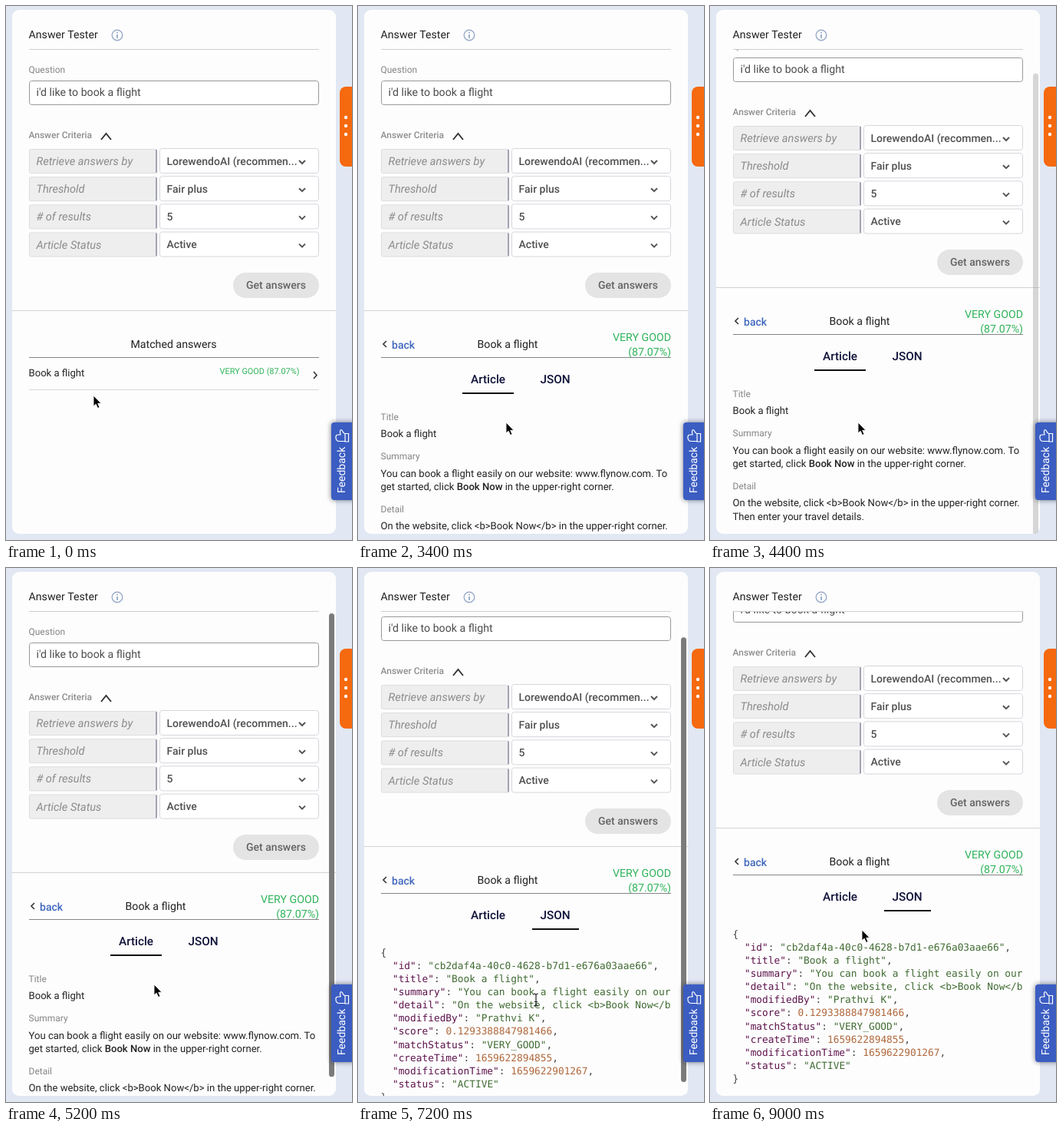
An HTML page that plays this animation: 451 px wide and 695 px high, repeating every 9.2 s.

```html
<!DOCTYPE html>
<html lang="en">
<head>
<meta charset="utf-8">
<title>Answer Tester</title>
<style>
  html, body { margin: 0; height: 100%; overflow: hidden; background: #e1e8f4; }
  svg { display: block; width: 451px; height: 695px; }
  text { font: 14.2px Roboto, sans-serif; fill: #222; white-space: pre; text-rendering: geometricPrecision; }
  .label { font-size: 12px; fill: #858585; }
  .medium { font-weight: 500; font-size: 14px; fill: #505050; }
  .hint { font-style: italic; font-size: 14.6px; fill: #8b8b8b; }
  .body { font-size: 13.1px; }
  .tab { font-weight: 500; font-size: 15.3px; fill: #11133a; }
  .good { fill: #2fb35a; text-anchor: end; }
  .mid { text-anchor: middle; }
  .line { fill: none; stroke: #333; stroke-width: 1.6; }
  .code text { font: 12.82px "DejaVu Sans Mono", monospace; fill: #444; }
  .code .key { fill: #5d124b; }
  .code .string { fill: #416c33; }
  .code .number { fill: #b0683c; }
</style>
</head>
<body>
<svg viewBox="0 0 451 695">
  <defs>
    <clipPath id="view"><path d="M8 57H430V679a8 8 0 0 1-8 8H16a8 8 0 0 1-8-8z"/></clipPath>
    <clipPath id="codeBox"><path d="M30 520H408V800H30z"/></clipPath>
    <filter id="shadow" x="-50%" y="-20%" width="200%" height="140%">
      <feDropShadow dx="0" dy="0" stdDeviation="3" flood-color="#223" flood-opacity=".65"/>
    </filter>
  </defs>

  <rect x="8" y="5" width="422" height="682" rx="9" fill="#fdfdfd"/>
  <text x="29.5" y="42">Answer Tester</text>
  <circle cx="145" cy="38" r="6.8" fill="none" stroke="#9aabca" stroke-width="1.4"/>
  <path d="M145 34v1.6M145 37v5" stroke="#8398c0" stroke-width="1.5"/>
  <path d="M30 56.5H408" stroke="#cfcfcf"/>

  <g clip-path="url(#view)">
    <g id="page">
      <text class="label" x="29.5" y="87">Question</text>
      <rect x="30.5" y="97.5" width="377" height="31" rx="3" fill="#fff" stroke="#999"/>
      <text x="39.5" y="117" style="fill:#4c4c4c">i'd like to book a flight</text>
      <text class="label" x="29.5" y="172" style="font-weight:500;fill:#8e8e8e">Answer Criteria</text>
      <path class="line" d="M124 174L130.5 166L137 174" style="stroke-width:1.9"/>
      <g id="criteria"></g>
      <rect x="296" y="347" width="112" height="33" rx="16.5" fill="#e4e4e4"/>
      <text class="medium mid" x="352" y="368" style="fill:#646464">Get answers</text>
      <path d="M8 396.5H430" stroke="#d3d3d6"/>

      <g id="list">
        <text class="mid" x="218.5" y="445">Matched answers</text>
        <text class="body" x="29.5" y="482">Book a flight</text>
        <text class="good" x="382.5" y="479" style="font-size:10.9px">VERY GOOD (87.07%)</text>
        <path class="line" d="M401 476L405 480.5L401 485"/>
        <path d="M30 499.5H408" stroke="#d8d8d8"/>
      </g>

      <g id="detail">
        <path class="line" d="M37 436L33 440L37 444"/>
        <text class="medium" x="44" y="446" style="fill:#3f67bd">back</text>
        <text x="155.5" y="445">Book a flight</text>
        <text class="good" x="408" y="436">VERY GOOD</text>
        <text class="good" x="408" y="455">(87.07%)</text>
        <text class="tab" x="147" y="491">Article</text>
        <text class="tab" x="237.5" y="491">JSON</text>
        <path id="underline" stroke="#111" stroke-width="2"/>
        <g id="article">
          <text class="label" x="29.5" y="539">Title</text>
          <text class="body" x="29.5" y="561">Book a flight</text>
          <text class="label" x="29.5" y="590">Summary</text>
          <text class="body" x="29.5" y="613">You can book a flight easily on our website: www.flynow.com. To</text>
          <text class="body" x="29.5" y="630">get started, click <tspan font-weight="500">Book Now</tspan> in the upper-right corner.</text>
          <text class="label" x="29.5" y="659">Detail</text>
          <text class="body" x="29.5" y="681">On the website, click &lt;b&gt;Book Now&lt;/b&gt; in the upper-right corner.</text>
          <text class="body" x="29.5" y="699">Then enter your travel details.</text>
        </g>
        <g id="json" class="code" clip-path="url(#codeBox)"></g>
      </g>
      <path d="M30 457.5H408" stroke="#858585"/>
    </g>
    <rect id="thumb" x="421" width="7" rx="3.5" fill="#7b7b7b"/>
  </g>

  <rect x="435" y="105" width="30" height="104" rx="8" fill="#f5690f"/>
  <g fill="#fff">
    <circle cx="443" cy="145" r="2.2"/><circle cx="443" cy="156" r="2.2"/><circle cx="443" cy="167" r="2.2"/>
  </g>
  <rect x="424" y="542" width="40" height="101" rx="4" fill="#3b5dc2" filter="url(#shadow)"/>
  <text transform="translate(441.5 634) rotate(-90)" style="font-size:14px;fill:#fff">Feedback</text>
  <path d="M442 557V566.5H433.5Q430.5 566 430 562.5V560Q430.5 558 433 558H436Q434.5 552 437 551.5Q438.5 552 439.5 555ZM442 556.5H446.5V567H442Z"
        fill="none" stroke="#fff" stroke-width="1.2"/>

  <g id="cursor">
    <path d="M0 0V14L3.2 11.2L5.6 16.5L8 15.4L5.7 10.3H10Z" fill="#000" stroke="#fff" stroke-width=".9"/>
    <path d="M-2 9V1.2Q-2-.6-.5-.6T1 1.2V6Q3 5 4 6.5Q6 5.8 6.8 7.2Q9 6.8 9 9V12Q9 14 7.5 17.5H-.5Q-1.5 14.5-5 10.5Q-4.5 8-2 10ZM2 11v4M4.3 11v4M6.5 11v4"
          fill="#fff" stroke="#000" stroke-width="1.1"/>
    <path d="M-3-8Q0-8 0-6Q0-8 3-8M0-6.5V6.5M-3 8Q0 8 0 6Q0 8 3 8M-2 2.5H2" fill="none" stroke="#222" stroke-width="1.2"/>
  </g>
</svg>

<script>
const LOOP = 9200, STEP = 200;
const OPEN = 1400, SHOW_JSON = 6400;
const ARROW = 0, HAND = 1, BEAM = 2;
const $ = id => document.getElementById(id);

const criteria = [
  ["Retrieve answers by", "LorewendoAI (recommen..."],
  ["Threshold", "Fair plus"],
  ["# of results", "5"],
  ["Article Status", "Active"]
];
$("criteria").innerHTML = criteria.map(([name, value], i) => `
  <g transform="translate(0 ${i * 36.2})">
    <rect x="30.5" y="186.5" width="166" height="31" rx="2" fill="#eeeeef" stroke="#dddde2"/>
    <path d="M196 187V217" stroke="#85879c" stroke-width="1.4"/>
    <text class="hint" x="39.5" y="207">${name}</text>
    <rect x="200.5" y="185.5" width="207" height="32" rx="3" fill="#fff" stroke="#d6d7dd"/>
    <text class="medium" x="209.5" y="206.5">${value}</text>
    <path class="line" d="M382 201L386 205L390 201" style="stroke:#555;stroke-width:2"/>
  </g>`).join("");

const record = {
  id: "cb2daf4a-40c0-4628-b7d1-e676a03aae66",
  title: "Book a flight",
  summary: "You can book a flight easily on our website: www.flynow.com.",
  detail: "On the website, click <b>Book Now</b> in the upper-right corner.",
  modifiedBy: "Prathvi K",
  score: 0.1293388847981466,
  matchStatus: "VERY_GOOD",
  createTime: 1659622894855,
  modificationTime: 1659622901267,
  status: "ACTIVE"
};
const span = (kind, s) => `<tspan class="${kind}">${s.replace(/</g, "&lt;")}</tspan>`;
const fields = Object.entries(record).map(([key, value], i, all) =>
  `  ${span("key", `"${key}"`)}: ${span(typeof value, JSON.stringify(value))}${i < all.length - 1 ? "," : ""}`);
$("json").innerHTML = ["{", ...fields, "}"].map((line, i) =>
  `<text x="29.5" y="${538.5 + i * 17.15}">${line}</text>`).join("");

// Tracks hold [time, value, ...]; values are interpolated linearly.
const pointer = [
  [0, 114, 507], [400, 114, 507], [1000, 88, 479], [1400, 88, 479], [2200, 193, 545],
  [2400, 193, 545], [2600, 193, 542], [5400, 193, 542], [6200, 266, 489], [6600, 266, 489],
  [7000, 232, 562], [7800, 232, 562], [8800, 198, 471]
];
const pointerKind = [[0, ARROW], [800, HAND], [1600, ARROW], [6000, HAND], [6800, BEAM], [8200, ARROW]];
const scroll = [[3400, 0], [4000, 30], [4400, 30], [5000, 0], [6800, 0], [7200, 34], [7600, 58]];
const barOpacity = [
  [3400, 0], [3600, 1], [4200, 1], [4400, .3], [4600, 1], [5200, 1], [5600, 0],
  [6800, 0], [7000, 1], [7800, 1], [8200, 0]
];

function at(track, t) {
  const next = track.findIndex(k => k[0] > t);
  if (next < 0) return track.at(-1).slice(1);
  if (next === 0) return track[0].slice(1);
  const a = track[next - 1], b = track[next], f = (t - a[0]) / (b[0] - a[0]);
  return a.slice(1).map((v, i) => v + (b[i + 1] - v) * f);
}
const show = (el, on) => el.style.display = on ? "" : "none";
const fade = (t, start) => Math.min(1, .3 + (t - start) / 600);

function draw(t) {
  const opened = t >= OPEN, json = t >= SHOW_JSON;
  show($("list"), !opened);
  show($("detail"), opened);
  show($("article"), !json);
  show($("json"), json);
  $("article").style.opacity = fade(t, OPEN);
  $("json").style.opacity = fade(t, SHOW_JSON);
  $("underline").setAttribute("d", json ? "M227 504H288" : "M136 504H203");

  const [offset] = at(scroll, t), view = 632, total = view + (json ? 58 : 30);
  $("page").setAttribute("transform", `translate(0 ${-offset})`);
  $("thumb").setAttribute("y", 59 + offset * view / total);
  $("thumb").setAttribute("height", view * view / total);
  $("thumb").style.opacity = at(barOpacity, t)[0];

  const kind = pointerKind.findLast(k => k[0] <= t)[1];
  $("cursor").setAttribute("transform", `translate(${at(pointer, t)})`);
  [...$("cursor").children].forEach((shape, i) => show(shape, i === kind));
}

function tick() {
  const t = performance.now() % LOOP;
  draw(Math.floor(t / STEP) * STEP);
  requestAnimationFrame(tick);
}
tick();
</script>
</body>
</html>
```
